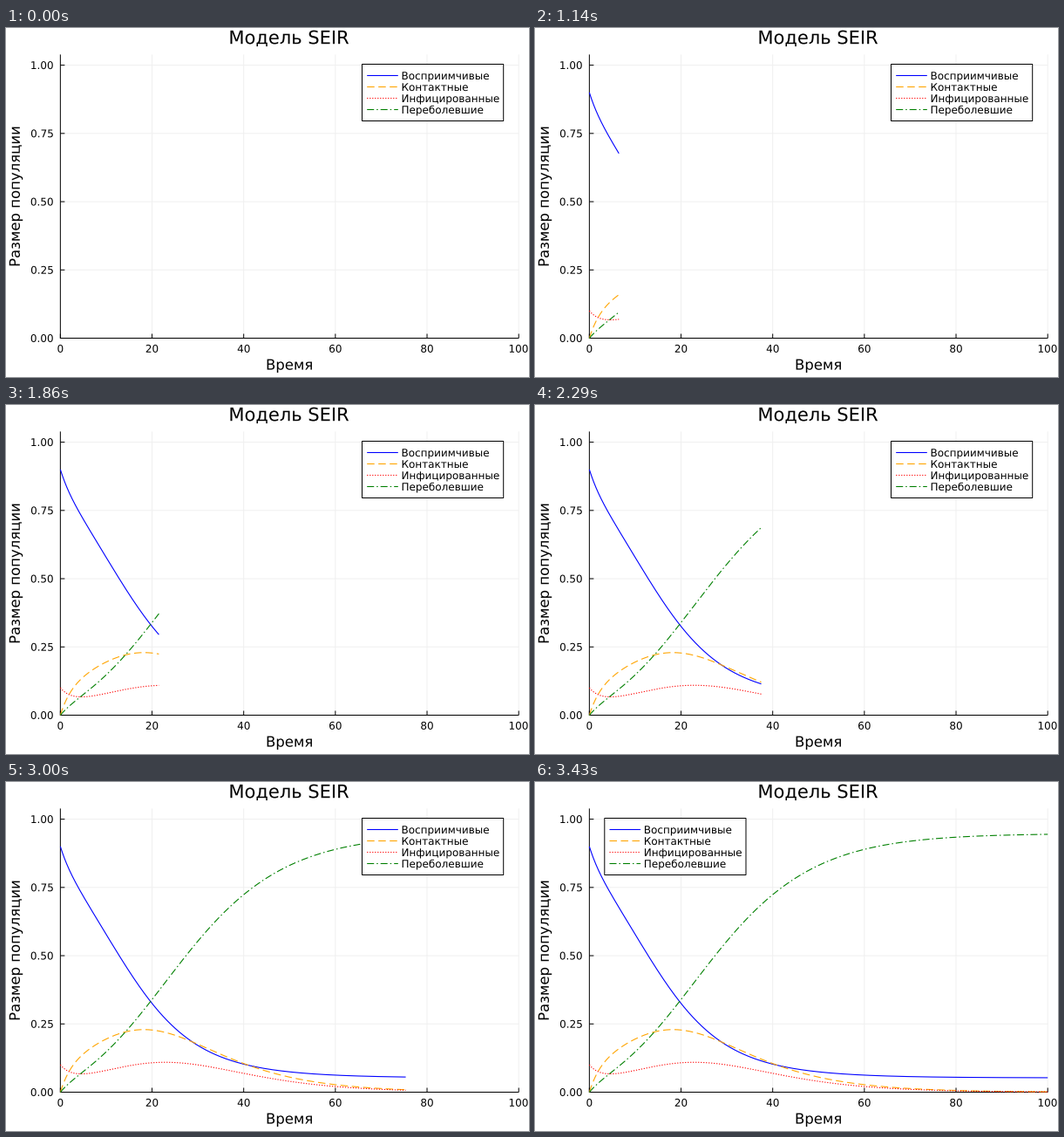
These frames come from a looping animation (600x400 px, 3.57 s). A matplotlib script:

```python
import numpy as np
import matplotlib.pyplot as plt
from matplotlib.animation import FuncAnimation
from matplotlib.patches import PathPatch, Rectangle
from matplotlib.textpath import TextPath
from matplotlib.transforms import Affine2D

W, H, DPI = 600, 400, 100
PX = 72 / DPI                       # one pixel in points
plt.rcParams["font.family"] = "DejaVu Sans"
plt.rcParams["lines.scale_dashes"] = False

LEFT, RIGHT, TOP, BOTTOM = 62.36, 588.2, 30.4, 355.5
UNIT = 312.9                        # pixels per 1.0 of population
MID_X, MID_Y = (LEFT + RIGHT) / 2, (TOP + BOTTOM) / 2
GRID = "#f0f0f0"

# SEIR model
BETA, SIGMA, GAMMA = 0.6, 0.1, 0.2
STEP = 0.05


def rate(u):
    s, e, i, _ = u
    new, sick, well = BETA * s * i, SIGMA * e, GAMMA * i
    return np.array([-new, new - sick, sick - well, well])


def solve(u, t_end):
    out = [u]
    for _ in range(round(t_end / STEP)):
        a = rate(u)
        b = rate(u + STEP / 2 * a)
        c = rate(u + STEP / 2 * b)
        d = rate(u + STEP * c)
        u = u + STEP / 6 * (a + 2 * b + 2 * c + d)
        out.append(u)
    return np.array(out).T


states = solve(np.array([0.9, 0.0, 0.1, 0.0]), 100)
grid_t = np.linspace(0, 100, states.shape[1])

# times reached by the adaptive solver, shown at 7 steps per second
TIMES = [0, 0.06, 0.25, 0.75, 1.35, 2.3, 3.45, 4.8, 6.45, 8.38, 10.85, 13.7,
         17.3, 21.5, 26.25, 31.4, 37.5, 45.65, 51.9, 59.5, 67.15, 75.35,
         84.5, 93.8, 100]
RATE = 7
TICK, LOOP = 10, 3570               # ms
LEGEND_MOVES = 22
LEGEND_SHIFT = -328.7
SERIES = [
    ("Восприимчивые", "blue", "-"),
    ("Контактные", "orange", (0, (8.5 * PX, 4.5 * PX))),
    ("Инфицированные", "red", (0, (1.2 * PX, 1.8 * PX))),
    ("Переболевшие", "green", (0, (8 * PX, 3 * PX, 1.5 * PX, 3 * PX))),
]


def px_x(t):
    return LEFT + (RIGHT - LEFT) * np.asarray(t) / 100


def px_y(v):
    return BOTTOM - UNIT * np.asarray(v)


fig = plt.figure(figsize=(W / DPI, H / DPI), dpi=DPI, facecolor="white")
ax = fig.add_axes([0, 0, 1, 1])
ax.set_xlim(0, W)
ax.set_ylim(H, 0)
ax.axis("off")


def line(xs, ys, color="black", width=1.0, **kw):
    return ax.plot(xs, ys, color=color, lw=width * PX, snap=False,
                   dash_capstyle="butt", solid_capstyle="butt", **kw)[0]


def label(x, y, text, size, align="center", angle=0, base=ax.transData,
          zorder=4):
    """Text as outlines with its baseline at a fractional pixel."""
    path = TextPath((0, 0), text, size=size)
    ink = path.get_extents()
    dx = {"left": 0, "center": (ink.x0 + ink.x1) / 2, "right": ink.x1}[align]
    place = Affine2D().translate(-dx, 0).scale(1, -1).rotate_deg(-angle)
    place.translate(x, y)
    return ax.add_patch(PathPatch(path, facecolor="black", lw=0, snap=False,
                                  transform=place + base, zorder=zorder))


for t in range(0, 101, 20):
    x = px_x(t)
    if t:
        line([x, x], [TOP, BOTTOM], GRID, zorder=1)
    line([x, x], [BOTTOM - 5, BOTTOM], zorder=2)
    label(x, 371.8, str(t), 12)
for v in (0, 0.25, 0.5, 0.75, 1):
    y = px_y(v)
    if v:
        line([LEFT, RIGHT], [y, y], GRID, zorder=1)
    line([LEFT, LEFT + 5], [y, y], zorder=2)
    label(53.8, y + 4.4, f"{v:.2f}", 12, "right")
line([LEFT, LEFT], [TOP, BOTTOM + 0.5], zorder=2)
line([LEFT, RIGHT], [BOTTOM, BOTTOM], zorder=2)

label(MID_X, 18.2, "Модель SEIR", 21)
label(MID_X, 391.6, "Время", 16.5)
label(15.8, MID_Y, "Размер популяции", 16.5, angle=90)

curves = [line([], [], color, 1.1, ls=style, zorder=3)
          for _, color, style in SERIES]

shift = Affine2D()
legend_base = shift + ax.transData
ax.add_patch(Rectangle((408.5, 41.5), 162.2, 65, facecolor="white",
                       edgecolor="black", lw=PX, snap=False,
                       transform=legend_base, zorder=5))
for k, (name, color, style) in enumerate(SERIES):
    y = 54.5 + 13 * k
    line([414.2, 449.8], [y, y], color, 1.1, ls=style, zorder=6,
         transform=legend_base)
    label(453.5, y + 4.5, name, 12, "left", base=legend_base, zorder=6)


def draw(tick):
    n = int((tick + 0.5) * TICK * RATE / 1000)
    end = TIMES[n]
    ts = np.linspace(0, end, 500) if end else np.array([])
    for curve, values in zip(curves, states):
        curve.set_data(px_x(ts), px_y(np.interp(ts, grid_t, values)))
    shift.clear().translate(LEGEND_SHIFT if n >= LEGEND_MOVES else 0, 0)
    return curves


anim = FuncAnimation(fig, draw, frames=LOOP // TICK, interval=TICK,
                     repeat=True, repeat_delay=0)
plt.show()
```
